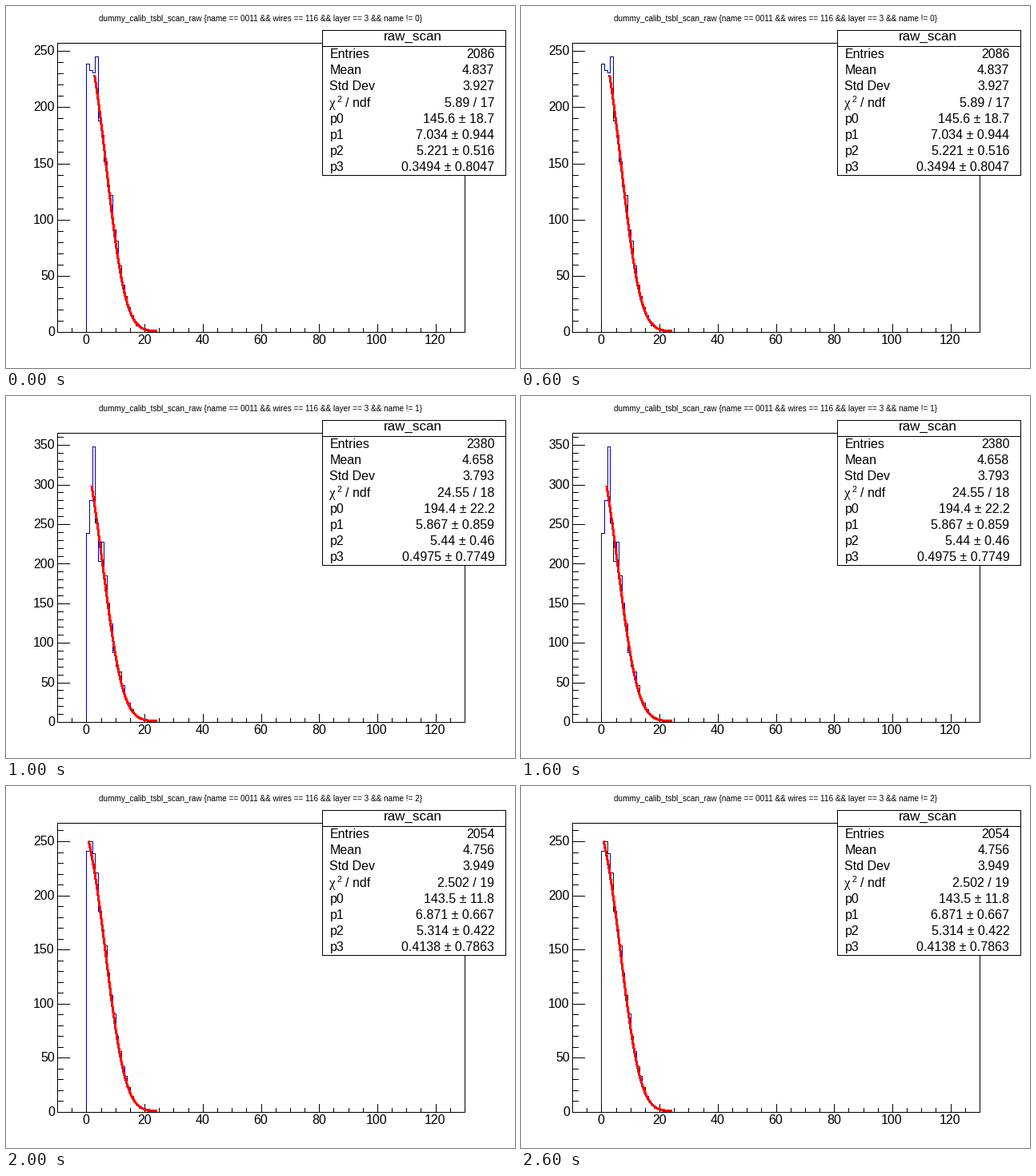
Recreate the animation shown at these times as a matplotlib script. Size 636 by 452 pixels, loop 3000 ms.

```python
import math

import matplotlib.pyplot as plt
import numpy as np
from matplotlib.animation import ArtistAnimation
from matplotlib.patches import Rectangle

W, H, DPI = 636, 452, 64  # a power of two keeps the pixel size exact
LEFT, RIGHT, TOP, BOTTOM = 63.5, 572.5, 45.5, 406.5
BOX_L, BOX_R, BOX_T, BOX_B = 394.5, 623.5, 29.5, 210.5
XMIN, XMAX = -10, 130
ROW = (BOX_B - BOX_T) / 9
PX = 72 / DPI  # points per pixel
BLUE, RED = "#000099", "#ff0000"

SCANS = [
    dict(
        ymax=257.25, start=3,
        bins=[239, 233, 231, 245, 188, 175, 152, 130, 122, 91, 81, 59, 42,
              32, 22, 15, 10, 6, 4, 3, 2, 1, 1],
        fit=(145.6, 7.034, 5.221, 0.3494),
        stats=["2086", "4.837", "3.927", "5.89 / 17", "145.6 ± 18.7",
               "7.034 ± 0.944", "5.221 ± 0.516", "0.3494 ± 0.8047"],
    ),
    dict(
        ymax=365.4, start=2,
        bins=[239, 280, 348, 252, 203, 228, 185, 151, 124, 88, 71, 64, 47,
              30, 24, 16, 11, 7, 4, 3, 2, 1, 1],
        fit=(194.4, 5.867, 5.44, 0.4975),
        stats=["2380", "4.658", "3.793", "24.55 / 18", "194.4 ± 22.2",
               "5.867 ± 0.859", "5.44 ± 0.46", "0.4975 ± 0.7749"],
    ),
    dict(
        ymax=267, start=1,
        bins=[241, 250, 239, 221, 186, 169, 154, 129, 108, 91, 70, 56, 42,
              33, 23, 15, 10, 7, 4, 3, 2, 1],
        fit=(143.5, 6.871, 5.314, 0.4138),
        stats=["2054", "4.756", "3.949", "2.502 / 19", "143.5 ± 11.8",
               "6.871 ± 0.667", "5.314 ± 0.422", "0.4138 ± 0.7863"],
    ),
]

plt.rcParams["font.family"] = "Liberation Sans"
fig = plt.figure(figsize=(W / DPI, H / DPI), dpi=DPI, facecolor="white")
ax = fig.add_axes([0, 0, 1, 1])
ax.set_xlim(0, W)
ax.set_ylim(H, 0)
ax.axis("off")


def crisp(v):
    return np.floor(v) + 0.5


def to_x(v):
    return LEFT + (np.asarray(v) - XMIN) * (RIGHT - LEFT) / (XMAX - XMIN)


def to_y(v, ymax):
    return BOTTOM - np.asarray(v) * (BOTTOM - TOP) / ymax


def line(xs, ys, color="black", width=1, z=3):
    return ax.plot(xs, ys, color=color, lw=width * PX, antialiased=False,
                   solid_joinstyle="miter", solid_capstyle="projecting",
                   zorder=z)[0]


def text(x, y, s, size=16, ha="left", **kw):
    return ax.text(x, y, s, fontsize=size * PX, ha=ha, va="baseline",
                   color="black", zorder=8, **kw)


def row_base(i):
    return BOX_T + ROW * (i + 0.5) + 5.6


def box(left, right, top, bottom, fill, z):
    ax.add_patch(Rectangle((left, top), right - left, bottom - top,
                           facecolor=fill, edgecolor="black", lw=PX,
                           antialiased=False, zorder=z))


def draw_static():
    box(LEFT, RIGHT, TOP, BOTTOM, "none", 3)
    for v in range(-5, XMAX, 5):
        x = crisp(to_x(v))
        line([x, x], [BOTTOM, BOTTOM - (10 if v % 20 == 0 else 5)])
        if v % 20 == 0:
            text(to_x(v), 421.5, str(v), ha="center")

    box(BOX_L, BOX_R, BOX_T, BOX_B, "white", 6)
    line([BOX_L, BOX_R], [49.5, 49.5], z=7)
    text(508.5, 43, "raw_scan", 17, "center")
    labels = ["Entries", "Mean", "Std Dev", None, "p0", "p1", "p2", "p3"]
    for i, label in enumerate(labels, 1):
        if label:
            text(404.5, row_base(i), label)
    y = row_base(4)
    text(404.5, y, "χ", 17, family="Liberation Serif")
    text(413.5, y - 6, "2", 10.5)
    text(424, y, "/ ndf")


def draw_scan(index, ymax, start, bins, fit, stats):
    title = ("dummy_calib_tsbl_scan_raw {name == 0011 && wires == 116 "
             f"&& layer == 3 && name != {index}}}")
    parts = [text(318, 19, title, 10, "center")]

    for v in range(0, int(ymax) + 1, 10):
        y = crisp(to_y(v, ymax))
        major = v % 50 == 0
        parts.append(line([LEFT, LEFT + (15 if major else 7)], [y, y]))
        if major:
            parts.append(text(60.8, to_y(v, ymax) + 5.6, str(v), ha="right"))

    edges = np.repeat(np.arange(len(bins) + 1), 2)
    heights = np.concatenate([[0], np.repeat(bins, 2), [0]])
    parts.append(line(crisp(to_x(edges)), crisp(to_y(heights, ymax)), BLUE, z=2))

    p0, p1, p2, p3 = fit
    xs = np.linspace(start, 24, 100)
    ys = [p0 * math.erfc((x - p1) / (p2 * math.sqrt(2))) + p3 for x in xs]
    parts.append(line(to_x(xs), to_y(ys, ymax), RED, 2, 4))

    for i, value in enumerate(stats, 1):
        parts.append(text(610.3, row_base(i), value, ha="right"))
    return parts


draw_static()
frames = [draw_scan(i, **scan) for i, scan in enumerate(SCANS)]
anim = ArtistAnimation(fig, frames, interval=1000, repeat=True,
                       repeat_delay=0, blit=False)
plt.show()
```
